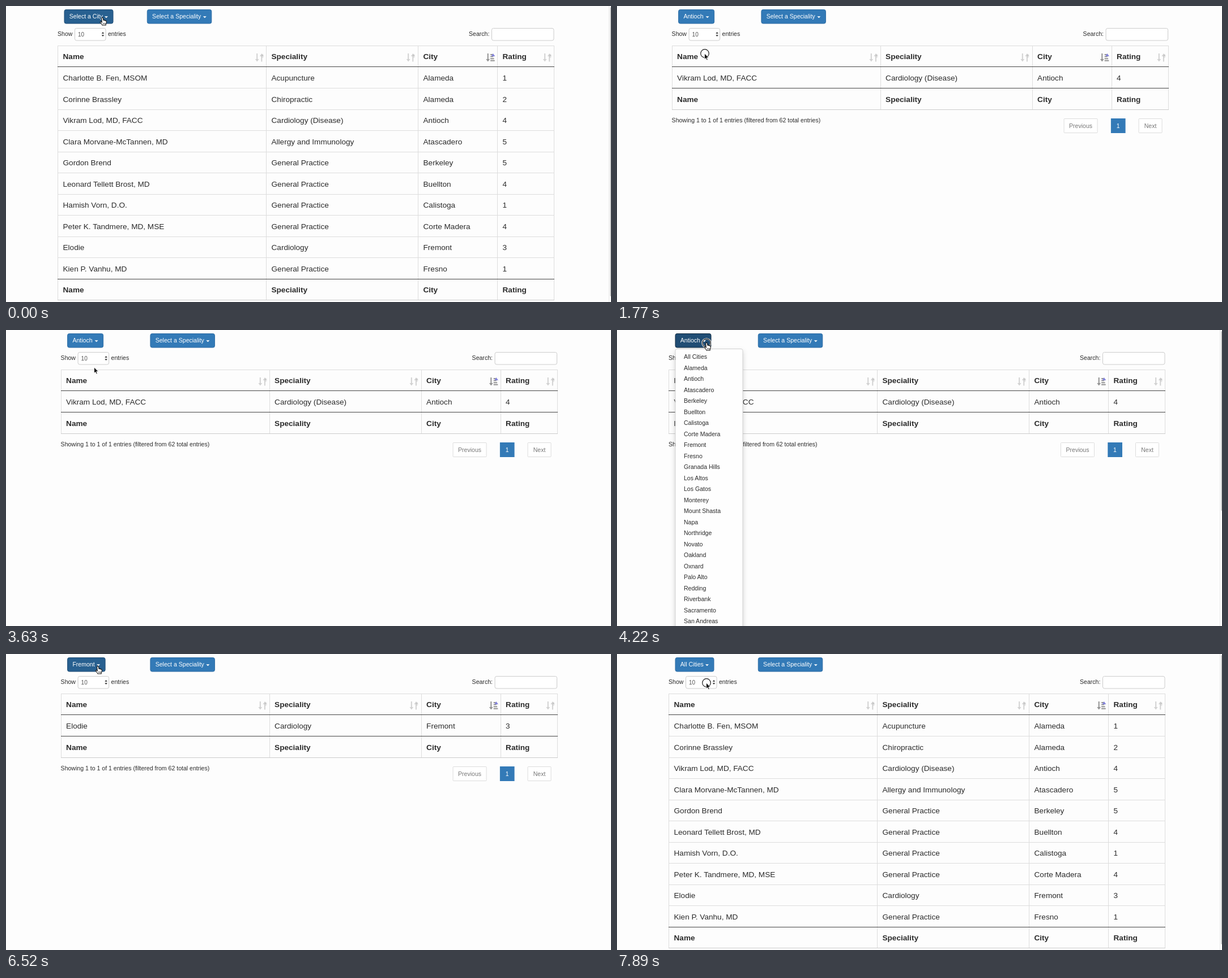
Animation of 1068x524 px, one loop 8000 ms. Source, as an HTML page:

```html
<!DOCTYPE html>
<html lang="en">
<head>
<meta charset="utf-8">
<title>Directory table</title>
<style>
  html, body { margin: 0; width: 100%; height: 100%; overflow: hidden; background: #fdfdfd; }
  svg { display: block; width: 100vw; height: 100vh; }
  text { font: 10.55px "Liberation Sans", Arial, sans-serif; fill: #2b2b2b; white-space: pre; }
  .cell { font-size: 13.6px; }
  .head { font-size: 13.6px; font-weight: bold; }
  .light { fill: #fff; }
  .muted { fill: #777; }
  .line { shape-rendering: crispEdges; }
  .menu { filter: drop-shadow(0 4px 4px rgba(0, 0, 0, .17)); }
</style>
</head>
<body>
<svg id="stage" viewBox="0 0 1068 524"></svg>
<script>
const stage = document.getElementById('stage');
const LOOP = 8000;

const people = [
  ['Charlotte B. Fen, MSOM', 'Acupuncture', 'Alameda', 1],
  ['Corinne Brassley', 'Chiropractic', 'Alameda', 2],
  ['Vikram Lod, MD, FACC', 'Cardiology (Disease)', 'Antioch', 4],
  ['Clara Morvane-McTannen, MD', 'Allergy and Immunology', 'Atascadero', 5],
  ['Gordon Brend', 'General Practice', 'Berkeley', 5],
  ['Leonard Tellett Brost, MD', 'General Practice', 'Buellton', 4],
  ['Hamish Vorn, D.O.', 'General Practice', 'Calistoga', 1],
  ['Peter K. Tandmere, MD, MSE', 'General Practice', 'Corte Madera', 4],
  ['Elodie', 'Cardiology', 'Fremont', 3],
  ['Kien P. Vanhu, MD', 'General Practice', 'Fresno', 1]
];
const cities = ('All Cities,Alameda,Antioch,Atascadero,Berkeley,Buellton,Calistoga,Corte Madera,Fremont,' +
  'Fresno,Granada Hills,Los Altos,Los Gatos,Monterey,Mount Shasta,Napa,Northridge,Novato,Oakland,' +
  'Oxnard,Palo Alto,Redding,Riverbank,Sacramento,San Andreas').split(',');
const titles = ['Name', 'Speciality', 'City', 'Rating'];
const columns = [91, 459, 727, 867, 967];
const buttonWidth = { 'Select a City': 87, Antioch: 64, Fremont: 67.5, 'All Cities': 69 };

// start, selected label, menu open
const views = [
  [0, 'Select a City', false], [170, 'Select a City', true],
  [1770, 'Antioch', false], [4220, 'Antioch', true],
  [5450, 'Fremont', false], [6820, 'Fremont', true],
  [7890, 'All Cities', false]
];
// start, x, y, pointer shape, click ring
const pointer = [
  [0, 170, 21, 'hand'], [710, 169, 27, 'hand'], [870, 165, 40, 'hand'], [1040, 159, 54, 'hand'],
  [1180, 157, 66, 'hand'], [1320, 156, 77, 'hand'], [1470, 155, 84, 'hand'],
  [1770, 155, 84, 'arrow', true], [1920, 155, 84, 'arrow'], [2070, 155, 84, 'hand'],
  [3630, 156, 66, 'arrow'], [3780, 157, 42, 'arrow'], [3920, 158, 23, 'hand'],
  [4220, 158, 23, 'hand', true], [4370, 158, 23, 'hand'], [4540, 158, 38, 'hand'],
  [4690, 159, 82, 'hand'], [4840, 162, 135, 'hand'], [4990, 166, 180, 'hand'], [5150, 169, 203, 'hand'],
  [5450, 169, 203, 'beam', true], [5600, 169, 203, 'beam'],
  [6080, 168, 155, 'arrow'], [6230, 166, 60, 'arrow'], [6370, 164, 30, 'hand'], [6520, 162, 22, 'hand'],
  [6820, 162, 22, 'hand', true], [6960, 162, 22, 'hand'],
  [7290, 161, 27, 'hand'], [7440, 160, 35, 'hand'], [7590, 159, 44, 'hand'], [7740, 158, 51, 'hand'],
  [7890, 158, 51, 'arrow', true]
];

const at = (list, t) => list.findLast(item => item[0] <= t);
const text = (x, y, s, cls = '', extra = '') => `<text x="${x}" y="${y}" class="${cls}" ${extra}>${s}</text>`;
const rect = (x, y, w, h, fill, extra = '') =>
  `<rect x="${x}" y="${y}" width="${w}" height="${h}" fill="${fill}" ${extra}/>`;
const line = (x, y, w, h, fill) => rect(x, y, w, h, fill, 'class="line"');
const box = (x, y, w, h, fill, stroke, r = 3) =>
  rect(x + .5, y + .5, w - 1, h - 1, fill, `rx="${r}" stroke="${stroke}"`);
const path = (d, fill, extra = '') => `<path d="${d}" fill="${fill}" ${extra}/>`;

function button(x, label, width, fill, border) {
  const caret = x + width - 12.5;
  return box(x, 6, width, 25.5, fill, border) + text(x + 9.3, 22.4, label, 'light') +
    path(`M${caret - 3} 18.2h6l-3 3z`, '#fff');
}

function sortIcon(x, sorted) {
  const down = `M${x + 2.2} 84h2v10h2.4l-3.4 4.6l-3.4 -4.6h2.4z`;
  if (sorted) {
    const bars = [4, 5.2, 6.4, 7.6].map((w, i) => `M${x + 7.6} ${85 + i * 3.6}h${w}v2h${-w}z`).join('');
    return path(down + bars, '#000', 'opacity=".42"') + path(`M${x + 9} 89l3.4 -5l3.4 5z`, '#8585dc');
  }
  return path(`${down}M${x + 10.3} 98.5v-9.500h-2.4l3.4 -5l3.4 5h-2.400v9.500z`, '#000', 'opacity=".17"') +
    path(`M${x + 11} 88l2.200 -3.500l2.200 3.500zm0 1.200h4.400l-2.200 3z`, '#000', 'opacity=".1"');
}

function table(rows, hover) {
  const bottom = 108 + 37.5 * (rows.length + 1);
  const row = (cells, y, cls) => cells.map((s, i) => text(columns[i] + 9.5, y, s, cls)).join('');
  let out = hover ? rect(91, 70, 877, 38, '#efefef') : '';
  out += row(titles, 94, 'head') + row(titles, 132 + 37.5 * rows.length, 'head');
  rows.forEach((cells, i) => {
    out += row(cells, 132 + 37.5 * i, 'cell');
    if (i) out += line(91, Math.round(107.9 + 37.5 * i), 877, 1, '#ddd');
  });
  for (const x of columns) out += line(x, 70, 1, bottom - 70, '#ddd');
  out += line(91, 70, 877, 1, '#ddd') + line(91, Math.floor(bottom), 877, 1, '#ccc');
  for (const y of [107, Math.floor(bottom - 37.5)]) out += line(91, y, 877, 1, '#444');
  return out + [440, 707, 847.5, 948].map((x, i) => sortIcon(x, i === 2)).join('');
}

function controls() {
  return text(91, 53.3, 'Show') + box(121, 39, 55.5, 22.5, '#fff', '#ccc') +
    text(127, 53.5, '10', '', 'style="font-size:10px;fill:#555"') +
    path('M168.800 49l2.200 -3.200l2.200 3.200zm0 2h4.400l-2.200 3.200z', '#444') +
    text(180, 53.3, 'entries') + text(817, 53.3, 'Search:') + box(857, 39, 110.5, 22.5, '#fff', '#ccc');
}

function pager() {
  return text(91, 206.3, 'Showing 1 to 1 of 1 entries (filtered from 62 total entries)') +
    box(783, 199, 60, 26, '#fff', '#ddd', 1) + text(813, 216, 'Previous', 'muted', 'text-anchor="middle"') +
    rect(866.3, 199, 25.7, 26, '#337ab7') + text(879, 216, '1', 'light', 'text-anchor="middle"') +
    box(915, 199, 42, 26, '#fff', '#ddd', 1) + text(936, 216, 'Next', 'muted', 'text-anchor="middle"');
}

function menu(y) {
  const hovered = Math.floor((y - 37.3) / 19.5);
  let out = `<g class="menu">${box(102.5, 33, 120, 560, '#fefefe', '#d2d2d2')}</g>`;
  if (hovered >= 0) out += rect(103.5, 37.3 + 19.5 * hovered, 118, 19.5, '#f3f3f3');
  return out + cities.map((city, i) => text(118, 51 + 19.5 * i, city)).join('');
}

const shapes = {
  hand: path('M-1.300 1Q-1.300 -.6 0 -.6Q1.200 -.6 1.400 1L1.900 4.200Q3.200 3.300 4 4.600Q5.200 4 5.800 5.200' +
    'Q7.200 4.900 7.300 6.600Q7.500 9 6.200 11V13H0Q-1 10.800 -3.600 8Q-4.200 6.400 -2.500 6.600L-.7 8.200Z',
    '#fff', 'stroke="#111" stroke-width="1.100" stroke-linejoin="round"') +
    path('M1.500 9v2.500M3.300 9v2.500M5 9v2.500', 'none', 'stroke="#111" stroke-width=".7"'),
  arrow: path('M-.5 0V10.500L1.900 8.300L3.500 12L5.300 11.200L3.700 7.600H7Z', '#111', 'stroke="#fff" stroke-width=".8"'),
  beam: path('M-2.500 -6Q0 -6 0 -4Q0 -6 2.500 -6M0 -4V4M-2.500 6Q0 6 0 4Q0 6 2.500 6M-1.500 2h3', 'none',
    'stroke="#222" stroke-width="1.100"')
};

function cursor(x, y, shape, ring) {
  const circle = (r, color, w) => `<circle r="${r}" fill="none" stroke="${color}" stroke-width="${w}"/>`;
  const click = ring ? circle(7.5, '#fff', 2.6) + circle(7.3, '#1a1a1a', 1.2) : '';
  return `<g transform="translate(${x} ${y})">${click}${shapes[shape]}</g>`;
}

function scene(view, point) {
  const [, label, open] = view;
  const [, x, y, shape, ring] = point;
  const filtered = label in buttonWidth && cities.indexOf(label) > 0;
  const rows = filtered ? people.filter(p => p[2] === label) : people;
  const scrolls = open || !filtered;
  const overButton = shape === 'hand' && y < 32;
  const headHover = !open && shape === 'hand' && y > 70;
  const [fill, border] = open ? ['#204d74', '#122b40'] : overButton ? ['#286090', '#204d74'] : ['#337ab7', '#2e6da4'];

  let page = controls() + table(rows, headHover) + (filtered ? pager() : '') +
    button(102.5, label, buttonWidth[label], fill, border) +
    button(248.8, 'Select a Speciality', 114.5, '#337ab7', '#2e6da4');
  if (open) page += menu(y);
  const bar = scrolls
    ? line(1064, 0, 1, 524, '#e8e8e8') + rect(1066.5, 2, 4, open ? 318 : 512, '#bdbdbd', 'rx="1.5"') : '';
  // Without a scrollbar the centred page sits slightly further right.
  return `<g transform="translate(${scrolls ? 0 : 5.6} 0)">${page}</g>${bar}${cursor(x, y, shape, ring)}`;
}

let shownView, shownPoint;
function draw(now) {
  const t = now % LOOP;
  const view = at(views, t), point = at(pointer, t);
  if (view !== shownView || point !== shownPoint) {
    stage.innerHTML = scene(view, point);
    shownView = view;
    shownPoint = point;
  }
}

const start = performance.now();
function tick() {
  draw(performance.now() - start);
  requestAnimationFrame(tick);
}
tick();
</script>
</body>
</html>
```
